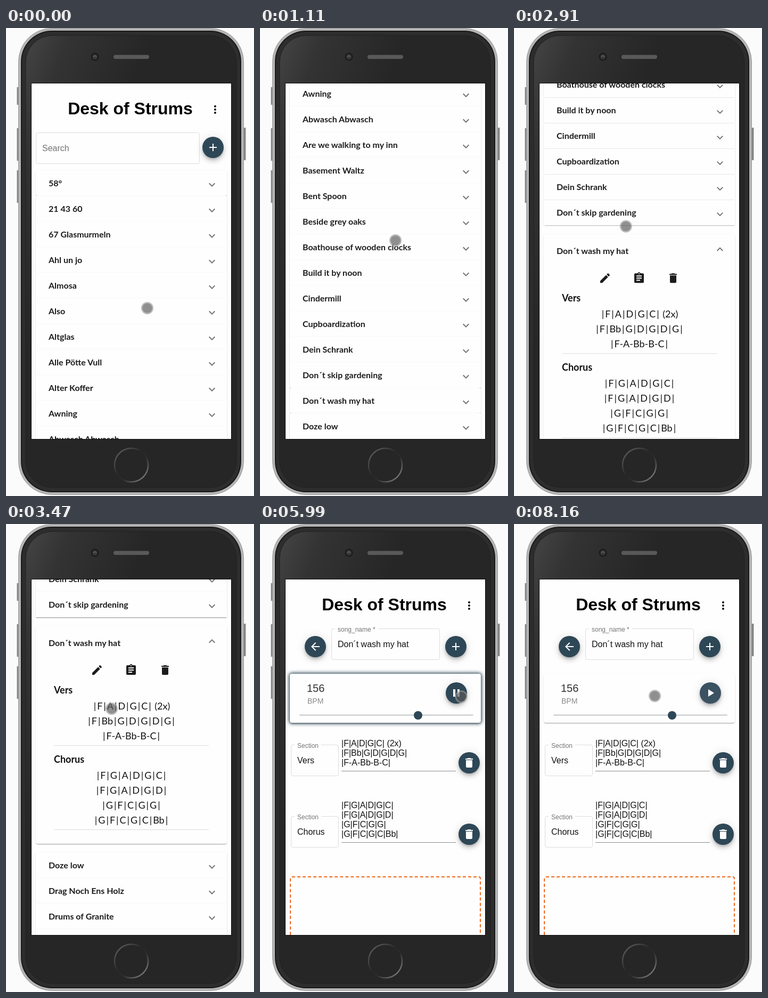
An HTML page that plays this animation: 466x878 px, repeating every 8.23 s.

```html
<!DOCTYPE html>
<html lang="en">
<head>
<meta charset="utf-8">
<title>Desk of Strums</title>
<style>
@property --open { syntax: "<number>"; inherits: true; initial-value: 0; }
:root { --t: 0; --loop: 8230ms; --now: calc(var(--t) * -1ms); --navy: #2e4756; }
html, body { margin: 0; width: 100%; height: 100%; overflow: hidden; background: #fbfbfb; }
body { position: relative; font: 16px/20px "Liberation Sans", Arial, sans-serif; color: #111; }
svg { display: block; }
.phone { position: absolute; left: 0; top: 0; }
.screen { position: absolute; left: 48px; top: 104px; width: 375px; height: 667px; overflow: hidden; background: #fefefe; outline: 1px solid #0c0c0c; }
.page { position: absolute; left: -48px; top: -104px; width: 466px; height: 2200px; }
.page > *, .abs { position: absolute; }
.icon { width: 24px; height: 24px; fill: currentColor; }

h1 { left: 48px; width: 371px; top: 131px; margin: 0; font-size: 32px; line-height: 40px; text-align: center; color: #000; }
.more { left: 381px; top: 141px; color: #000; }
.field { box-sizing: border-box; height: 59px; border: 1px solid rgba(0,0,0,.13); border-radius: 4px; }
.field span, .field label { position: absolute; left: 11px; top: 19px; white-space: nowrap; }
.field label { left: 6px; top: -9px; padding: 0 5px; font-size: 12px; color: #757575; background: #fefefe; }
.hint span { color: #757575; }
.fab { width: 40px; height: 40px; margin: -20px; border-radius: 50%; color: #fff; background: var(--navy);
  box-shadow: 0 3px 5px -1px rgba(0,0,0,.2), 0 6px 10px rgba(0,0,0,.14), 0 1px 18px rgba(0,0,0,.12); }
.fab .icon { position: absolute; left: 8px; top: 8px; }
.card, .row { background: #fefefe; box-shadow: 0 2px 1px -1px rgba(0,0,0,.2), 0 1px 1px rgba(0,0,0,.14), 0 1px 3px rgba(0,0,0,.12); }

.list { left: 56px; top: 267px; width: 359px; }
.row { position: relative; }
.row:first-child, .row.open { border-radius: 4px; }
.head { position: relative; height: 48px; }
.head b { position: absolute; left: 24px; top: calc(50% - 10px); font-family: Lato, sans-serif; white-space: nowrap; color: #1c1c1c; }
.head .icon { position: absolute; left: 319px; top: calc(50% - 9px); color: #757575; }
.open { margin: calc(var(--open) * 16px) 0; animation: unfold var(--loop) linear var(--now) infinite paused; }
.open .head { height: calc(48px + var(--open) * 16px); }
.open .head .icon { transform-origin: 50% 9px; transform: rotate(calc(var(--open) * 180deg)); }
.body { position: relative; height: calc(var(--open) * 345px); overflow: hidden; font-family: Lato, sans-serif; }
.body .icon { position: absolute; top: 7px; color: #1c1c1c; }
.song { position: absolute; left: 34px; top: 41px; width: 291px; }
.song h3 { margin: 0; font-size: 18px; line-height: 31px; }
.song p { margin: 0 0 10px; padding-bottom: 4px; border-bottom: 1px solid #dcdcdc; font-size: 18px; line-height: 28px; text-align: center; white-space: pre-line; }
.song i { font-style: normal; margin: 0 .11em; }

.tempo { left: 56px; top: 281px; width: 359px; height: 92px; border-radius: 4px; }
.value { left: 32px; top: 17px; font-size: 20px; color: #333; }
.unit { left: 33px; top: 41px; font-size: 14px; color: #8a8a8a; }
.track { left: 18px; top: 76px; width: 327px; height: 3px; border-radius: 2px; background: #d5d7d8; }
.thumb { left: 233px; top: 70px; width: 16px; height: 16px; border-radius: 50%; background: var(--navy); }
.glow { inset: 0; border-radius: 4px; animation: beat 384.6ms linear calc(5870ms + var(--now)) infinite paused; }
.play { animation: pressed var(--loop) step-end var(--now) infinite paused; }
.on { animation: on var(--loop) step-end var(--now) infinite paused; }
.off { animation: off var(--loop) step-end var(--now) infinite paused; }
.chords { left: 153px; width: 215px; padding-bottom: 6px; border-bottom: 1px solid #8c8c8c; line-height: 18px; white-space: pre; }
.drop { box-sizing: border-box; left: 56px; top: 661px; width: 359px; height: 300px; border: 2px dashed #ea6a20; border-radius: 4px; }

.home { animation: scroll var(--loop) ease-in-out var(--now) infinite paused, leave var(--loop) step-end var(--now) infinite paused; }
.edit { animation: settle var(--loop) ease-in-out var(--now) infinite paused, enter var(--loop) step-end var(--now) infinite paused; }
.touch { position: absolute; left: -11.5px; top: -11.5px; width: 19px; height: 19px; border: 2px solid rgba(165,165,165,.75); border-radius: 50%;
  background: rgba(90,90,90,.68) padding-box; animation: point var(--loop) linear var(--now) infinite paused; }

@keyframes scroll {
  0%, 1.46% { transform: translateY(0); }
  12.15%, 13.97% { transform: translateY(-600px); }
  19.68%, 34.63% { transform: translateY(-900px); }
  41.31%, 100% { transform: translateY(-1100px); }
}
@keyframes settle {
  0%, 61.97% { transform: translateY(-18px); }
  65.37%, 100% { transform: translateY(0); }
}
@keyframes unfold {
  0%, 29.2% { --open: 0; animation-timing-function: ease-in-out; }
  33.2%, 100% { --open: 1; }
}
@keyframes leave { 0% { visibility: visible; } 51.64%, 100% { visibility: hidden; } }
@keyframes enter { 0% { visibility: hidden; } 51.64%, 100% { visibility: visible; } }
@keyframes on { 0%, 94.53%, 100% { opacity: 0; } 71.32% { opacity: 1; } }
@keyframes off { 0%, 94.53%, 100% { opacity: 1; } 71.32% { opacity: 0; } }
@keyframes pressed { 0% { background: var(--navy); } 94.53%, 100% { background: #3a5261; } }
@keyframes beat {
  from { box-shadow: 0 0 8px 2px var(--navy); }
  to { box-shadow: 0 0 3px 1px var(--navy); }
}
@keyframes point {
  0% { transform: translate(265px, 525px); }
  4.86% { transform: translate(262px, 470px); }
  13.49% { transform: translate(254px, 398px); }
  20.29% { transform: translate(229px, 411px); }
  21.99% { transform: translate(216px, 402px); }
  24.54%, 29.4% { transform: translate(222px, 396px); }
  35.24% { transform: translate(210px, 372px); }
  42.16% { transform: translate(198px, 346px); }
  47.39%, 51.52% { transform: translate(171px, 274px); }
  59.17%, 65.4% { transform: translate(293px, 350px); }
  71.08% { transform: translate(376px, 322px); }
  84.69% { transform: translate(390px, 334px); }
  93.56%, 95.75% { transform: translate(374px, 331px); }
  99.15%, 100% { transform: translate(264px, 322px); }
}
</style>
</head>
<body>
<svg class="phone" width="466" height="878">
  <defs>
    <linearGradient id="shell" x2=".35" y2=".3">
      <stop offset="0" stop-color="#454545"/><stop offset=".35" stop-color="#333"/><stop offset="1" stop-color="#262626"/>
    </linearGradient>
    <linearGradient id="ring" x2="1" y2="1">
      <stop offset=".1" stop-color="#5c5c5c"/><stop offset=".45" stop-color="#272727"/>
      <stop offset=".6" stop-color="#2c2c2c"/><stop offset=".9" stop-color="#7c7c7c"/>
    </linearGradient>
    <pattern id="mesh" width="3" height="3" patternUnits="userSpaceOnUse">
      <rect width="3" height="3" fill="#3a3a3a"/><path d="M0 0h1.5v1.5H0zM1.5 1.5H3V3H1.5z" fill="#777"/>
    </pattern>
  </defs>
  <path d="M20.5 111h3v33h-3zM20.5 188h3v61h-3zM20.5 267h3v61h-3zM447 187h3.500v61h-3.500z" fill="#858585"/>
  <rect x="23.500" y=".5" width="423" height="875" rx="63" fill="#b5b5b5" stroke="#999"/>
  <rect x="28" y="5" width="414" height="866" rx="58" fill="#191919"/>
  <rect x="30" y="7" width="410" height="862" rx="56" fill="#2d2d2d"/>
  <rect x="37" y="14" width="396" height="848" rx="50" fill="url(#shell)" stroke="#202020"/>
  <circle cx="167" cy="54" r="6.500" fill="#303030" stroke="#191919" stroke-width="2"/>
  <circle cx="167" cy="54" r="3" fill="#5a5a5a"/><circle cx="167" cy="55" r="1.500" fill="#222"/>
  <rect x="202" y="50.500" width="67" height="7.500" rx="3.700" fill="url(#mesh)"/>
  <circle cx="235.500" cy="820" r="31.500" fill="none" stroke="url(#ring)" stroke-width="2.500"/>
</svg>
<div class="screen">
  <div class="page home"></div>
  <div class="page edit"></div>
</div>
<div class="touch"></div>

<script>
const paths = {
  more: 'M12 8a2 2 0 1 0 0-4 2 2 0 0 0 0 4zm0 2a2 2 0 1 0 0 4 2 2 0 0 0 0-4zm0 6a2 2 0 1 0 0 4 2 2 0 0 0 0-4z',
  add: 'M19 13h-6v6h-2v-6H5v-2h6V5h2v6h6v2z',
  down: 'M16.59 8.59L12 13.17 7.41 8.59 6 10l6 6 6-6z',
  back: 'M20 11H7.83l5.59-5.59L12 4l-8 8 8 8 1.41-1.41L7.83 13H20v-2z',
  play: 'M8 5v14l11-7z',
  pause: 'M6 19h4V5H6v14zm8-14v14h4V5h-4z',
  bin: 'M6 19c0 1.1.9 2 2 2h8c1.1 0 2-.9 2-2V7H6v12zM19 4h-3.5l-1-1h-5l-1 1H5v2h14V4z',
  pen: 'M3 17.25V21h3.75L17.81 9.94l-3.75-3.75L3 17.25zM20.71 7.04c.39-.39.39-1.02 0-1.41l-2.34-2.34c-.39-.39-1.02-.39-1.41 0l-1.83 1.83 3.75 3.75 1.83-1.83z',
  sheet: 'M19 3h-4.18C14.4 1.84 13.3 1 12 1c-1.3 0-2.4.84-2.82 2H5c-1.1 0-2 .9-2 2v14c0 1.1.9 2 2 2h14c1.1 0 2-.9 2-2V5c0-1.1-.9-2-2-2zm-7 0c.55 0 1 .45 1 1s-.45 1-1 1-1-.45-1-1 .45-1 1-1zm2 14H7v-2h7v2zm3-4H7v-2h10v2zm0-4H7V7h10v2z'
};
const song = "Don´t wash my hat";
const titles = ["58°", "21 43 60", "67 Glasmurmeln", "Ahl un jo", "Almosa", "Also", "Altglas", "Alle Pötte Vull",
  "Alter Koffer", "Awning", "Abwasch Abwasch", "Are we walking to my inn", "Basement Waltz", "Bent Spoon",
  "Beside grey oaks", "Boathouse of wooden clocks", "Build it by noon", "Cindermill", "Cupboardization",
  "Dein Schrank", "Don´t skip gardening", song, "Doze low", "Drag Noch Ens Holz", "Drums of Granite",
  "Dä Topp", "Ein Wäschekorb", "En singem kelder", "Et Kütt Ene Boot", ""];
const parts = [
  ["Vers", "|F|A|D|G|C| (2x)\n|F|Bb|G|D|G|D|G|\n|F-A-Bb-B-C|"],
  ["Chorus", "|F|G|A|D|G|C|\n|F|G|A|D|G|D|\n|G|F|C|G|G|\n|G|F|C|G|C|Bb|"]
];

const icon = (name, cls = '', style = '') =>
  `<svg class="icon ${cls}" style="${style}" viewBox="0 0 24 24"><path d="${paths[name]}"/></svg>`;
const fab = (x, y, inner, cls = '') => `<div class="fab abs ${cls}" style="left:${x}px;top:${y}px">${inner}</div>`;
const field = (x, y, w, text, label) =>
  `<div class="field ${label ? '' : 'hint'}" style="left:${x}px;top:${y}px;width:${w}px">
    ${label ? `<label>${label}</label>` : ''}<span>${text}</span></div>`;
const header = `<h1>Desk of Strums</h1>${icon('more', 'more')}`;

const details = () => `<div class="body">
  ${['pen', 'sheet', 'bin'].map((n, i) => icon(n, '', `left:${103 + 64 * i}px`)).join('')}
  <div class="song">${parts.map(([name, text]) =>
    `<h3>${name}</h3><p>${text.replace(/\|/g, '<i>|</i>')}</p>`).join('')}</div></div>`;
const row = title => `<div class="row ${title === song ? 'open' : ''}">
  <div class="head"><b>${title}</b>${icon('down')}</div>${title === song ? details() : ''}</div>`;

const section = ([name, text], i) => {
  const y = 414 + 134 * i, lines = text.split('\n').length;
  return field(58, y, 90, name, 'Section') +
    `<div class="chords" style="top:${y + 43 - 18 * lines}px">${text}</div>` +
    fab(393, y + 34, icon('bin'));
};

document.querySelector('.home').innerHTML = header + field(56, 196, 308, 'Search') +
  fab(389, 224, icon('add')) + `<div class="list">${titles.map(row).join('')}</div>`;

document.querySelector('.edit').innerHTML = header + fab(104, 230, icon('back')) +
  field(134, 196, 204, song, 'song_name *') + fab(368, 230, icon('add')) +
  `<div class="card tempo">
    <div class="on abs" style="inset:0"><div class="glow abs"></div></div>
    <span class="value abs">156</span><span class="unit abs">BPM</span>
    <div class="track abs"></div><div class="thumb abs"></div>
    ${fab(313, 36, icon('play', 'off') + icon('pause', 'on'), 'play')}
  </div>` + parts.map(section).join('') + '<div class="drop"></div>' + fab(235, 808, icon('add'));

const snap = t => {
  if (t >= 2420) return 2420 + Math.floor((t - 2420) / 70) * 70;
  return t < 60 ? 0 : Math.min(2020, 60 + Math.floor((t - 60) / 70) * 70);
};
const start = performance.now();
function tick() {
  const t = (performance.now() - start) % 8230;
  document.documentElement.style.setProperty('--t', snap(t));
  requestAnimationFrame(tick);
}
tick();
</script>
</body>
</html>
```
